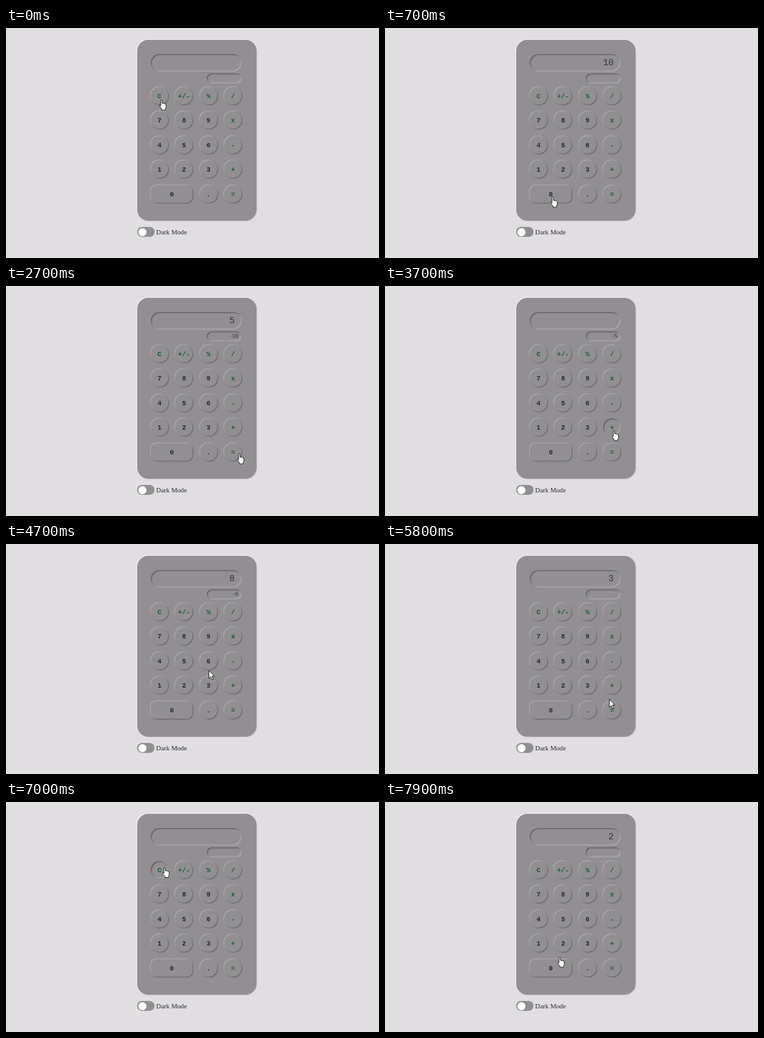
These frames come from a looping animation (600 px wide and 370 px high, 8000 ms). An HTML page:

```html
<!DOCTYPE html>
<html lang="en">
<head>
<meta charset="utf-8">
<title>Calculator</title>
<style>
  html, body { margin: 0; width: 100%; height: 100%; overflow: hidden; background: #e0dee1; }
  body { position: relative; color: #29282b; font-family: "Liberation Mono", monospace; }
  body div, svg { position: absolute; box-sizing: border-box; }
  #calc {
    left: 211px; top: 19px; width: 192px; height: 291px; border-radius: 18px;
    background: #918f92; box-shadow: 1px 1px 1px #c9c7ca, -1px -1px 1px #f2f0f3;
  }
  .screen {
    border-radius: 14px; text-align: right; color: #39373a; white-space: pre;
    box-shadow: inset 1px 1px 2px #545255, inset -1px -1px 2px #b9b7ba;
  }
  #main { left: 233px; top: 42px; width: 146px; height: 28px; padding-right: 11px; font-size: 14.4px; line-height: 29px; }
  #sub { left: 323px; top: 73px; width: 56px; height: 16px; padding-right: 5px; font-size: 9px; line-height: 17px; }
  #keys {
    left: 233px; top: 95px; display: grid; gap: 11.4px;
    grid-template: repeat(5, 28px) / repeat(4, 28px);
  }
  #keys div {
    position: static; border-radius: 14px; text-align: center;
    font-size: 10.7px; font-weight: bold; line-height: 30px;
    box-shadow: 1px 1px 1.5px #656366, -1px -1px 1.5px #b1afb2;
  }
  #keys .op { color: #175c3c; }
  #keys .wide { grid-column: span 2; border-radius: 9px; }
  #keys .down { box-shadow: inset 1px 1px 2px #504e51, inset -1px -1px 2px #b5b3b6; }
  #toggle { left: 211px; top: 320px; width: 28px; height: 16px; border-radius: 8px; background: #918f92; }
  #toggle div { left: 1.5px; top: 1.5px; width: 13px; height: 13px; border-radius: 50%; background: #fff; }
  #mode { left: 241.6px; top: 320px; font: 10.8px/16px "Liberation Serif", serif; white-space: pre; }
  svg { left: 0; top: 0; width: 13px; height: 18px; overflow: visible; fill: #fff; stroke: #111; stroke-width: .9; stroke-linejoin: round; }
</style>
</head>
<body>
<div id="calc"></div>
<div id="main" class="screen"></div>
<div id="sub" class="screen"></div>
<div id="keys"></div>
<div id="toggle"><div></div></div>
<div id="mode">Dark Mode</div>
<svg id="cursor">
  <path id="arrow" d="M0 0V12.6L2.9 9.9 4.9 14.6 7 13.7 5 9.1H8.8Z"/>
  <path id="hand" transform="translate(-4 0)" d="M3 10V1.6Q3 .4 4.1 .4T5.3 1.6V5.8Q6.4 4.9 7.3 6.1 8.4 5.3 9.3 6.6 11.4 6 11.4 8.2V11.4Q11.4 13.4 10.2 14.6V16.6H4.6V15L1 10.4Q.2 9 1.2 8.6 2 8.4 3 10Z"/>
</svg>
<script>
const LOOP = 8000, STEP = 100, HOLD = 100, HOVER = 20;
const $ = id => document.getElementById(id);

const keys = {};
for (const label of "C +/- % / 7 8 9 x 4 5 6 - 1 2 3 + 0 . =".split(" ")) {
  const key = keys[label] = document.createElement("div");
  key.textContent = label;
  key.classList.toggle("op", !/[\d.]/.test(label));
  key.classList.toggle("wide", label === "0");
  $("keys").append(key);
}

// Each click: key, time, and where the pointer rests from the key's centre
const clicks = [
  ["C", -100], ["1", 250], ["0", 550], ["+/-", 1300], ["+", 2100], ["5", 2400],
  ["=", 2750, 10, 3], ["+", 3700], ["8", 4300], ["=", 5100, 10, 3],
  ["C", 7000, 8, -4], ["2", 7550], ["0", 8250]
].map(([label, time, dx = 3, dy = 5]) => {
  const box = keys[label].getBoundingClientRect();
  return { label, time, x: box.x + box.width / 2 + dx, y: box.y + box.height / 2 + dy };
});

// The calculator itself: what one key does to the two displays
function press({ main, sub }, label) {
  if (label === "C") return { main: "", sub: "" };
  if (label === "+/-") return { main: String(-main), sub };
  if (label === "+") return { main: "", sub: main };
  if (label === "=") return { main: String(+sub + +main), sub: "" };
  return { main: main + label, sub };
}

// Rest after a click, then glide to the next key and wait there
function glide(progress) {
  const p = Math.min(1, Math.max(0, (progress - .25) / .55));
  return p * p * (3 - 2 * p);
}

function draw(t) {
  const done = clicks.filter(click => click.time <= t);
  const from = done.at(-1), to = clicks[done.length];

  const p = glide((t - from.time) / (to.time - from.time));
  const x = from.x + (to.x - from.x) * p, y = from.y + (to.y - from.y) * p;
  const hover = [from, to].some(stop => Math.hypot(x - stop.x, y - stop.y) < HOVER);
  $("cursor").style.transform = `translate(${x}px, ${y}px)`;
  $("hand").style.display = hover ? "" : "none";
  $("arrow").style.display = hover ? "none" : "";

  const { main, sub } = done.reduce((state, click) => press(state, click.label), {});
  $("main").textContent = main;
  $("sub").textContent = sub;
  for (const label in keys) {
    keys[label].classList.toggle("down", label === from.label && t - from.time < HOLD);
  }
}

const start = performance.now();
function tick() {
  const t = (performance.now() - start) % LOOP;
  draw(Math.floor(t / STEP) * STEP);
  requestAnimationFrame(tick);
}
tick();
</script>
</body>
</html>
```
